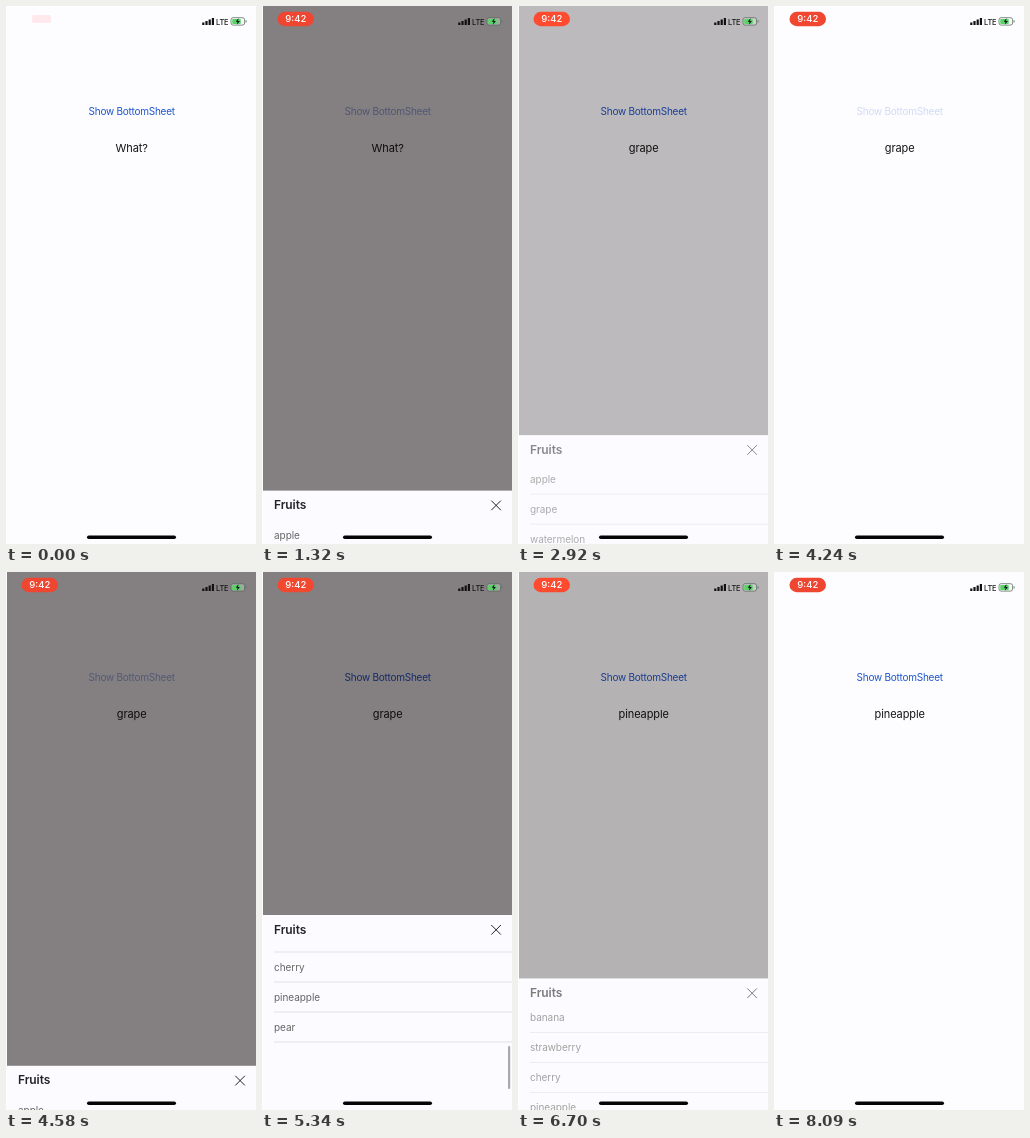
Recreate the animation shown at these times as an HTML page. Size 250 px wide and 538 px high, loop 8.11 s.

```html
<!DOCTYPE html>
<html lang="en">
<head>
<meta charset="utf-8">
<title>Bottom sheet</title>
<style>
  html, body { margin: 0; width: 100%; height: 100%; overflow: hidden; background: #fdfdff; }
  svg { display: block; }
  text { font-family: Inter, "Open Sans", sans-serif; }
  .item { font-size: 10px; letter-spacing: -.05px; fill: #666; }
</style>
</head>
<body>
<svg width="250" height="538" viewBox="0 0 250 538">
  <rect width="250" height="538" fill="#fdfdff"/>
  <text id="button" x="125.7" y="109" text-anchor="middle" font-size="10" letter-spacing="-.25" fill="#1f55cc">Show BottomSheet</text>
  <text id="choice" x="125.7" y="146" text-anchor="middle" font-size="11" letter-spacing="-.1" fill="#151515"></text>

  <g id="modal">
    <rect x="1" width="249" height="538" fill="#0d0305" fill-opacity=".5"/>
    <g id="sheet">
      <rect x="1" width="249" height="196" fill="#fcfbff"/>
      <text x="12" y="18.5" font-size="12" font-weight="600" letter-spacing="-.1" fill="#242424">Fruits</text>
      <path d="M229.3 10l9.6 9.6m0-9.6l-9.6 9.6" stroke="#222" fill="none"/>
      <svg y="29" width="250" height="166" overflow="hidden">
        <g id="list"></g>
        <rect id="bar" x="246" width="2.2" rx="1.1" fill="#a9a8ab"/>
      </svg>
    </g>
  </g>

  <rect id="glow" x="26" y="9" width="19" height="8" rx="2" fill="#ffe9ec"/>
  <g id="pill">
    <rect id="pillBg" x="15.5" y="5.8" width="36.5" height="14.4" rx="7.2"/>
    <text x="33.8" y="16.4" text-anchor="middle" font-size="9.5" font-weight="500" fill="#fff">9:42</text>
  </g>
  <path d="M196.2 16.5h2.2v2.5h-2.2zM199.4 15h2.2v4h-2.2zM202.6 13.5h2.2v5.5h-2.2zM205.8 12h2.2v7h-2.2z" fill="#111"/>
  <text x="210" y="18.6" font-size="7.4" font-weight="500" letter-spacing="-.1" fill="#151515">LTE</text>
  <rect x="225" y="11.7" width="13.6" height="7.4" rx="2.1" fill="#fff" fill-opacity=".3" stroke="#59705c" stroke-width=".8"/>
  <rect x="226.2" y="12.9" width="8.6" height="5" rx="1" fill="#58d36b"/>
  <path d="M239.6 14v2.8q1.1-.4 1.1-1.4t-1.1-1.4z" fill="#69756b"/>
  <path d="M232.6 12l-2.9 3.8h1.9l-.7 3 3-3.9h-1.9z" fill="#111"/>
  <rect x="81" y="529.4" width="89" height="3.5" rx="1.75" fill="#050505"/>
</svg>
<script>
const LOOP = 8110, ROW = 30, TOP = 343, HEIGHT = 195;
const VIEW = 166, INSET = 21;
const fruits = ["apple", "grape", "watermelon", "banana", "strawberry", "cherry", "pineapple", "pear"];
const MAX = fruits.length * ROW + INSET - VIEW;
const PULL = 47;
const visits = [{ open: 1000, close: 2780 }, { open: 4270, close: 6580 }];
const $ = id => document.getElementById(id);
const set = (id, attrs) => {
  for (const k in attrs) $(id).setAttribute(k, attrs[k]);
};

$("list").innerHTML = fruits.map((name, i) =>
  `<text class="item" x="12" y="${i * ROW + 19}">${name}</text>
   <path d="M12 ${i * ROW + 30}H250" stroke="#dcdae0" stroke-width=".8"/>`).join("");

const ramp = (t, start, length) => Math.min(1, Math.max(0, (t - start) / length));
const inOut = p => p < .5 ? 2 * p * p : 1 - 2 * (1 - p) ** 2;
const out = p => 1 - (1 - p) ** 3;

function buttonOpacity(t, open) {
  return 1 - .8 * (ramp(t, open - 120, 80) - ramp(t, open + 250, 200));
}

function scrollAt(t) {
  return (MAX + PULL) * inOut(ramp(t, 4900, 420)) - PULL * out(ramp(t, 5400, 500));
}

function draw(t) {
  const { open, close } = visits[t < 3500 ? 0 : 1];
  const fade = ramp(t, open, 280) - ramp(t, close, 300);
  const slide = inOut(ramp(t, open + 210, 300)) - inOut(ramp(t, close, 300));
  set("modal", { opacity: fade });
  set("sheet", { transform: `translate(0 ${TOP + HEIGHT * (1 - slide)})` });
  set("button", { opacity: buttonOpacity(t, open) });
  $("choice").textContent = t < visits[0].close ? "What?" : t < visits[1].close ? "grape" : "pineapple";

  const scroll = scrollAt(t);
  const track = VIEW - INSET;
  const over = Math.max(0, scroll - MAX);
  const length = 90 - over;
  set("list", { transform: `translate(0 ${-scroll})` });
  set("bar", {
    y: (track - length) * Math.min(1, scroll / MAX),
    height: length,
    opacity: ramp(t, 4900, 100) - ramp(t, 5950, 300)
  });

  // The recording pill fades in, then pulses slightly
  const shown = ramp(t, 20, 380);
  const pulse = .5 - .5 * Math.cos((t - 1320) / 3385 * 2 * Math.PI);
  set("glow", { opacity: 1 - shown });
  set("pill", { opacity: shown });
  set("pillBg", { fill: `rgb(${238 + 17 * pulse},${70 + 5 * pulse},48)` });
}

const begin = performance.now();
function tick() {
  draw((performance.now() - begin) % LOOP);
  requestAnimationFrame(tick);
}
tick();
</script>
</body>
</html>
```
